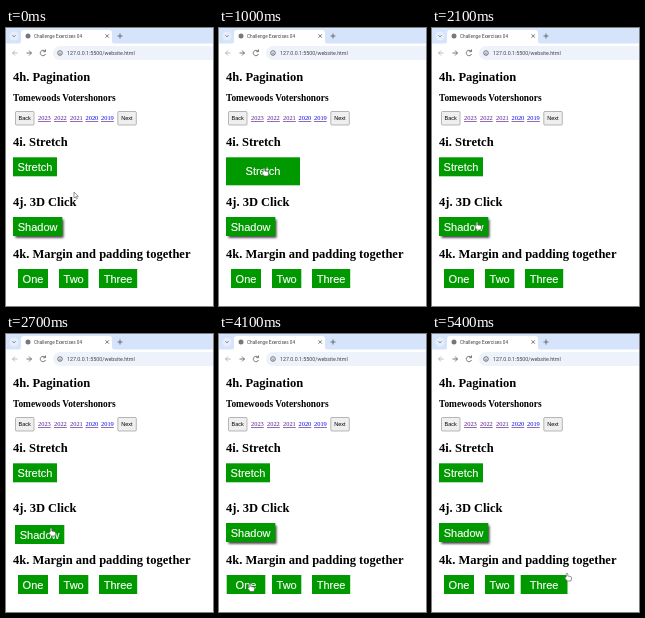
An HTML page that plays this animation: 207x278 px, repeating every 5.5 s.

```html
<!DOCTYPE html>
<html lang="en">
<head>
<meta charset="utf-8">
<title>Button exercises</title>
<style>
html, body { margin: 0; height: 100%; overflow: hidden; background: #fff; }
svg { display: block; width: 100vw; height: 100vh; }
text { font-family: Arial, "Liberation Sans", sans-serif; }
.serif text { font-family: "Times New Roman", "Liberation Serif", serif; }
.ui text { font-family: Roboto, sans-serif; fill: #444; }
.heads { font-weight: bold; font-size: 12.5px; }
.links { font-size: 6.4px; text-decoration: underline; }
.nav rect { fill: #efefef; stroke: #8a8a8a; stroke-width: .6; }
.nav text { font-size: 5.5px; text-anchor: middle; }
.btn rect { fill: #009900; }
.btn text { font-size: 11px; fill: #fff; stroke: #fff; stroke-width: .15; text-anchor: middle; }
.line { fill: none; stroke: #555; stroke-width: .8; }
.line.pale { stroke: #aaa; }
.pointer { fill: #fff; stroke: #555; stroke-width: .6; stroke-linejoin: round; }
</style>
</head>
<body>
<svg viewBox="0 0 207 278">
  <defs><filter id="blur" x="-20%" y="-40%" width="140%" height="180%"><feGaussianBlur stdDeviation=".9"/></filter></defs>
  <g class="ui">
    <rect width="207" height="16" fill="#d5e3fb"/>
    <circle cx="8" cy="8" r="4.5" fill="#e6eefc"/>
    <path class="line" d="M6.500 7.300L8 8.800 9.500 7.300"/>
    <path d="M12 16Q15 16 15 13V5Q15 2 18 2H103Q106 2 106 5V13Q106 16 109 16Z" fill="#fff"/>
    <rect y="15.5" width="207" height="18" fill="#fff"/>
    <rect x="47" y="18" width="170" height="14" rx="7" fill="#eef2fa"/>
    <circle cx="22" cy="8" r="2.5" fill="#74797f"/>
    <text x="28" y="10" font-size="4.7">Challenge Exercises 04</text>
    <path class="line" d="M99.500 6.300l3.400 3.400m0-3.400l-3.400 3.400M111.500 8h5m-2.500-2.500v5"/>
    <path class="line pale" d="M11.500 25h-5m2.500-2.500L6.500 25 9 27.500"/>
    <path class="line" d="M20.500 25h5m-2.500-2.500l2.500 2.500-2.500 2.500"/>
    <path class="line" d="M39 23.200A2.700 2.700 0 1 0 39.500 26M39.500 21.500v2.200h-2.200"/>
    <circle class="line" cx="54" cy="25" r="2.300"/>
    <path class="line" d="M54 24.500v2"/>
    <text x="61" y="27" font-size="5.3">127.0.0.1:5500/website.html</text>
  </g>
  <g class="serif heads">
    <text x="7" y="53">4h. Pagination</text>
    <text x="7" y="73" font-size="9.4">Tomewoods Votershonors</text>
    <text x="7" y="118">4i. Stretch</text>
    <text x="7" y="178">4j. 3D Click</text>
    <text x="7" y="230">4k. Margin and padding together</text>
  </g>
  <g class="nav">
    <rect x="9.5" y="83.500" width="18.500" height="13.500" rx="1"/><text x="18.700" y="92.200">Back</text>
    <rect x="111.800" y="83.500" width="18.500" height="13.500" rx="1"/><text x="121" y="92.200">Next</text>
  </g>
  <g class="serif links" fill="#551a8b">
    <text x="32" y="92">2023</text>
    <text x="48" y="92">2022</text>
    <text x="64" y="92">2021</text>
    <g fill="#0000ee"><text x="79.500" y="92">2020</text><text x="95" y="92">2019</text></g>
  </g>
  <rect id="shade" x="9.500" y="191.500" width="48" height="18.300" fill="#444" filter="url(#blur)"/>
  <g id="buttons"></g>
  <g id="cursor" class="pointer">
    <path id="arrow" d="M0 0V6L1.400 4.700 2.400 7 3.400 6.500 2.500 4.400H4.300Z"/>
    <path id="hand" d="M-.8 4V.6Q0-.5.8.6V3L4 3.700Q4.800 4 4.600 5L4 8H.2L-2.200 5Q-2 4-.8 4Z"/>
  </g>
</svg>
<script>
const LOOP = 5500, STEP = 100;
const $ = id => document.getElementById(id);
const clamp = x => Math.min(1, Math.max(0, x));
const ease = x => 1 - (1 - clamp(x)) ** 2;
const hover = (t, from, to, span) => ease((t - from) / span) - ease((t - to) / span);
const show = (id, visible) => $(id).style.display = visible ? "" : "none";

function makeButton(label) {
  const add = (parent, name) =>
    parent.appendChild(document.createElementNS("http://www.w3.org/2000/svg", name));
  const group = add($("buttons"), "g");
  group.setAttribute("class", "btn");
  const box = add(group, "rect"), text = add(group, "text");
  text.textContent = label;
  return (x, y, width, height) => {
    Object.entries({ x, y, width, height }).forEach(([k, v]) => box.setAttribute(k, v));
    text.setAttribute("x", x + width / 2);
    text.setAttribute("y", y + height / 2 + 4);
  };
}

const [stretch, shadow, one, two, three] =
  ["Stretch", "Shadow", "One", "Two", "Three"].map(makeButton);

// time, x, y of the pointer tip
const path = [
  [0, 68, 164], [400, 43, 137], [1000, 45, 140], [1300, 62, 165],
  [1700, 60, 184], [2100, 45, 194], [3600, 45, 194], [3900, 31, 249],
  [4300, 31, 250], [4600, 67, 249], [4800, 67, 249], [5100, 111, 247], [5400, 135, 239]
];

function pointerAt(t) {
  const i = Math.max(1, path.findIndex(p => p[0] >= t));
  const [t0, x0, y0] = path[i - 1], [t1, x1, y1] = path[i];
  const k = clamp((t - t0) / (t1 - t0));
  return [x0 + (x1 - x0) * k, y0 + (y1 - y0) * k];
}

function draw(t) {
  const s = hover(t, 100, 1200, 300);
  stretch(7, 129.3, 44 + 30 * s, 19 + 9 * s);

  const pressed = t >= 2700 && t < 3500;
  shadow(pressed ? 9 : 7, pressed ? 191 : 189, 49.3, 19);
  show("shade", !pressed);

  const spread = (button, x, width, from, to) => {
    const grow = 4.3 * hover(t, from, to, 200);
    button(x - grow, 241, width + 2 * grow, 19);
  };
  spread(one, 12, 30, 3850, 4350);
  spread(two, 53, 29.3, 4450, 4850);
  spread(three, 93, 38.2, 4950, LOOP);

  const over = (t >= 200 && t < 1200) || (t >= 1900 && t < 3700) || t >= 3850;
  $("cursor").setAttribute("transform", `translate(${pointerAt(t)})`);
  show("cursor", t < 1300 || t >= 1700);
  show("hand", over);
  show("arrow", !over);
}

function tick() {
  draw(Math.floor(performance.now() % LOOP / STEP) * STEP);
  requestAnimationFrame(tick);
}
tick();
</script>
</body>
</html>
```
